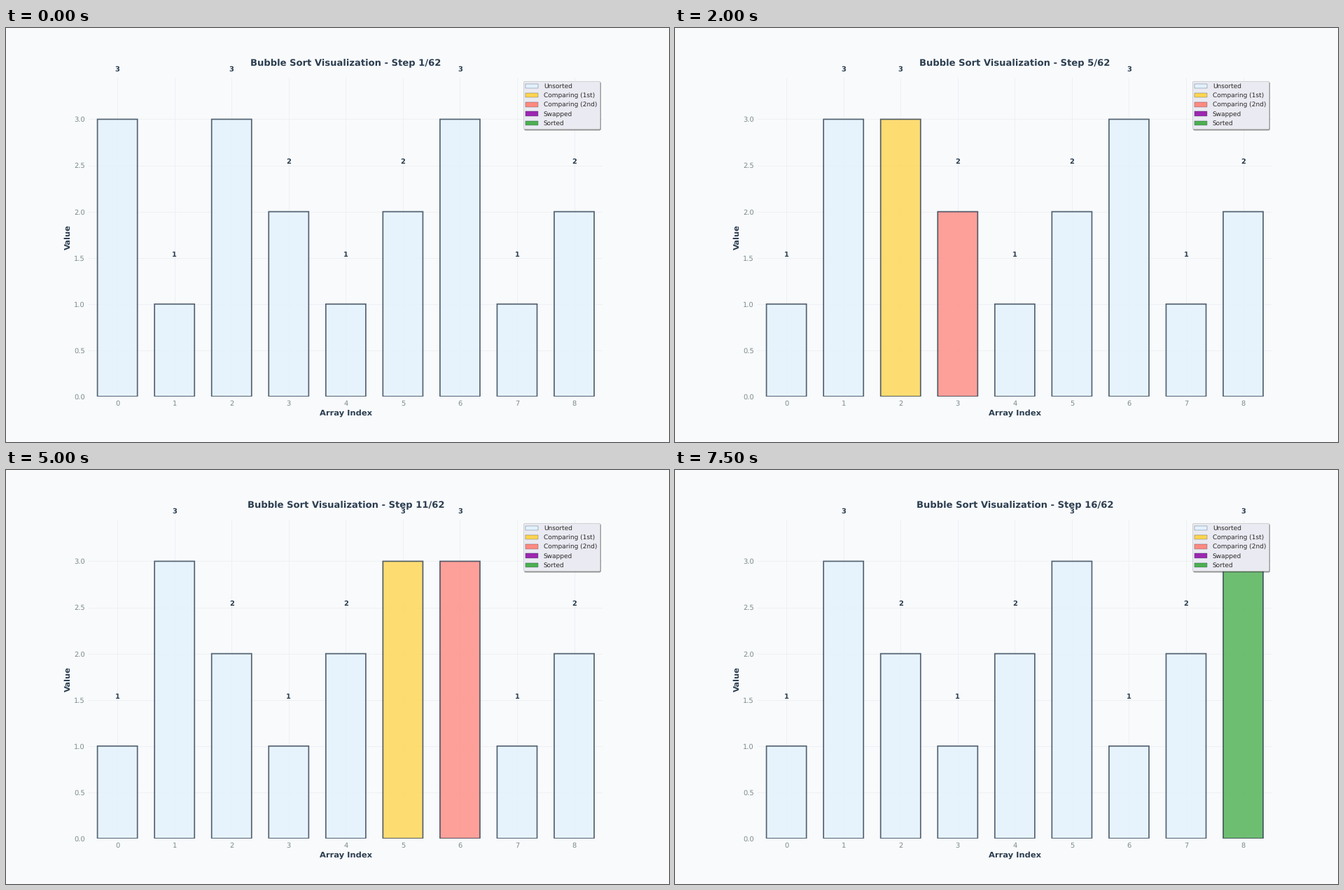
Animation, 947 px wide and 592 px high, one loop 8000 ms. Source, as a matplotlib script:

```python
import matplotlib.pyplot as plt
from matplotlib.animation import FuncAnimation
from matplotlib.patches import Patch

VALUES = [3, 1, 3, 2, 1, 2, 3, 1, 2]
SHOWN = 16
STEP_MS = 500

BG = "#F8FAFC"
INK = "#2C3E50"
MUTED = "#7F8C8D"
GRID = "#ECEFF2"
UNSORTED, FIRST, SECOND, SWAPPED, SORTED = (
    "#E3F2FD", "#FFD54F", "#FF8A80", "#9C27B0", "#4CAF50")
LEGEND = {
    "Unsorted": UNSORTED,
    "Comparing (1st)": FIRST,
    "Comparing (2nd)": SECOND,
    "Swapped": SWAPPED,
    "Sorted": SORTED,
}


def bubble_sort(values):
    """Yield (values, {index: colour}) for every step of the sort."""
    a = list(values)
    done = {}
    yield a[:], {}
    for end in range(len(a) - 1, -1, -1):
        for j in range(end):
            yield a[:], {**done, j: FIRST, j + 1: SECOND}
            if a[j] > a[j + 1]:
                a[j], a[j + 1] = a[j + 1], a[j]
                yield a[:], {**done, j: SWAPPED, j + 1: SWAPPED}
        done[end] = SORTED
        yield a[:], dict(done)


steps = list(bubble_sort(VALUES))

plt.rcParams.update({
    "font.family": "DejaVu Sans",
    "text.hinting": "none",
    "axes.axisbelow": True,
})

fig, ax = plt.subplots(figsize=(15.997, 10), dpi=59.2, facecolor=BG)
ax.set_facecolor(BG)
ax.spines[:].set_visible(False)
ax.grid(color=GRID, linewidth=1)
ax.tick_params(length=0, pad=7, labelsize=12, labelcolor=MUTED)

bars = ax.bar(range(len(VALUES)), VALUES, width=0.7, alpha=0.8,
              color=UNSORTED, edgecolor=INK, linewidth=2.1, snap=False)
labels = [ax.text(i, v + 0.5, str(v), ha="center", va="bottom",
                  fontsize=12, fontweight="bold", color=INK)
          for i, v in enumerate(VALUES)]

ax.set_xlim(-0.5, len(VALUES) - 0.5)
ax.set_ylim(0, max(VALUES) * 1.15)
ax.set_xticks(range(len(VALUES)))
ax.set_xlabel("Array Index", fontsize=14, fontweight="bold", color=INK)
ax.set_ylabel("Value", fontsize=14, fontweight="bold", color=INK)
title = ax.set_title("", fontsize=16, fontweight="bold", color=INK, pad=20)

ax.legend(
    handles=[Patch(facecolor=c, edgecolor=INK, linewidth=0.4, label=name)
             for name, c in LEGEND.items()],
    loc="upper right", fontsize=11, labelcolor="#262626",
    facecolor="#EAEAF2", edgecolor="#CCCCCC", framealpha=1,
    fancybox=True, shadow=True)


def update(k):
    values, marks = steps[k]
    for i, (bar, label, v) in enumerate(zip(bars, labels, values)):
        bar.set_height(v)
        bar.set_facecolor(marks.get(i, UNSORTED))
        label.set_y(v + 0.5)
        label.set_text(str(v))
    title.set_text(f"Bubble Sort Visualization - Step {k + 1}/{len(steps)}")
    return [*bars, *labels, title]


anim = FuncAnimation(fig, update, frames=SHOWN, interval=STEP_MS,
                     repeat=True, repeat_delay=0, blit=False)
plt.show()
```
